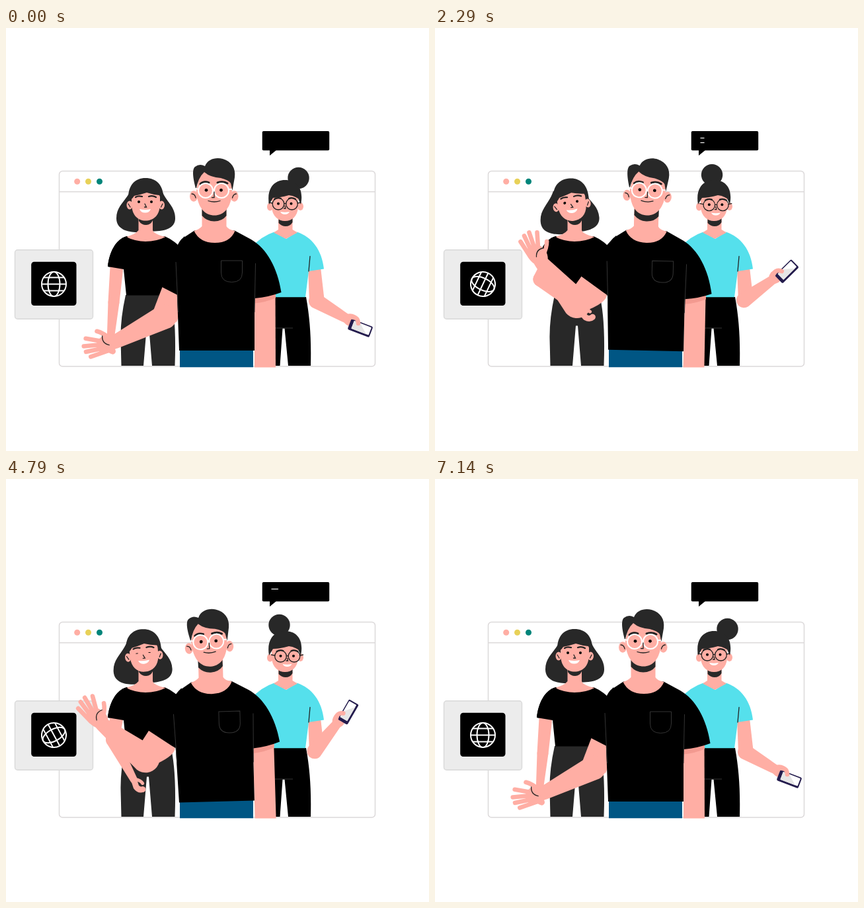
Write an HTML page that moves like this. It is 640x640 px and loops after 7.21 s.

```html
<!DOCTYPE html>
<html lang="en">
<head>
<meta charset="utf-8">
<title>Team greeting</title>
<style>
  html, body { margin: 0; width: 100%; height: 100%; overflow: hidden; background: #fff; }
  svg { display: block; width: 100%; height: 100%; }
  .skin { fill: #ffaea4; }
  .dark { fill: #282828; }
  .line { fill: none; stroke: #222; stroke-width: 1.3; stroke-linecap: round; }
  .brow { fill: none; stroke: #222; stroke-width: 2.2; stroke-linecap: round; }
  .seam { fill: none; stroke: #343434; stroke-width: 1; }
  .frame { fill: none; stroke: #dcd9da; stroke-width: 1.5; }
  .white { fill: none; stroke: #fff; stroke-width: 2; }
  .finger { fill: none; stroke: #ffaea4; stroke-width: 6.6; stroke-linecap: round; stroke-linejoin: round; }
</style>
</head>
<body>
<svg viewBox="0 0 640 640">
  <defs><clipPath id="floor"><rect width="640" height="513.5"/></clipPath></defs>

  <!-- browser window -->
  <rect class="frame" x="80.5" y="216.5" width="478" height="295.5" rx="5"/>
  <path class="frame" d="M80.500 247.800H558.500"/>
  <circle cx="107.700" cy="232.300" r="4.500" fill="#ffaea4"/>
  <circle cx="124.500" cy="232.300" r="4.500" fill="#e8d158"/>
  <circle cx="141.500" cy="232.300" r="4.500" fill="#00857a"/>

  <!-- speech bubble -->
  <rect x="387.700" y="156" width="101.500" height="29.200" rx="2"/>
  <path d="M399 184V193L410 184Z"/>
  <path id="text1" stroke="#fff" stroke-width="1.2"/>
  <path id="text2" stroke="#fff" stroke-width="1.2"/>

  <!-- icon card -->
  <rect x="13.500" y="335.700" width="118" height="104.500" rx="4" fill="#ececec" stroke="#d9d9d9" stroke-width="1.400"/>
  <rect x="38.200" y="353.700" width="68.300" height="66.300" rx="4.500"/>
  <g id="globe" class="white">
    <circle r="18.500"/><ellipse rx="9" ry="18.500"/>
    <path d="M-18.500 0H18.500M-15.500 -10H15.500M-15.500 10H15.500"/>
  </g>

  <!-- woman on the left -->
  <g>
    <path id="hairBack" class="dark" d="M190 243C182 262 167 268 167 288C167 305 185 309 198 309L225 307.500C246 307 256 300 256 288C256 268 240 262 235 243Z"/>
    <path class="dark" d="M181 404Q173 440 173.500 470L174.500 511H208L213 450.500H216L221 511H255.500Q258 440 249 404Z"/>
    <path d="M183 315C166 319 156 340 154 361L178 365L182 404.500H262V330Q252 320 240 315Z"/>
    <path class="skin" d="M200.500 284V306Q196 312 181.500 316Q196 323 211 323Q228 323 241.500 316Q224 312 222 306V284Z"/>
    <path class="dark" d="M201 285V292Q205 298 212 298Q219 298 222 291V285Z"/>
    <g id="leftHead">
      <ellipse class="skin" cx="187" cy="268" rx="4.500" ry="6.500"/>
      <ellipse class="skin" cx="235.500" cy="268" rx="4.500" ry="6.500"/>
      <path class="skin" d="M190 245V268C191 284 200 291.500 211 291.500C223 291.500 232 284 233 268V245Z"/>
      <path class="dark" d="M185.500 262C183 240 194 227 211 227C229 227 240 240 238 262Q234 259 232 253Q222 252 213 249Q204 252 194 254Q190 260 185.500 262Z"/>
      <path class="brow" d="M196 256Q200 253.500 206 255M216 255Q222 253 227 256"/>
      <ellipse class="eyeL" cx="201" cy="263" rx="2" ry="2"/><ellipse class="eyeL" cx="220" cy="263" rx="2" ry="2"/>
      <path class="line" d="M210 266L212.500 271H209.500M185 266L188 271M237 266L234.500 271"/>
      <path fill="#fff" d="M202 274Q211 276 219 274Q217 279.500 210.500 279.500Q204 279.500 202 274Z"/>
    </g>
    <path id="leftUpper" class="skin"/><path id="leftFore" class="skin"/>
    <g id="leftHand">
      <path class="finger" style="stroke-width:9" d="M0 0L11 2Q18 1 19 -5"/>
      <path class="finger" style="stroke-width:5" d="M0 -2Q6 -9 11 -9"/>
    </g>
    <path d="M183 315C166 319 156 340 154 361L178 365L190 330Z"/>
  </g>

  <!-- woman on the right -->
  <g>
    <path d="M383 407H454C460 440 462 470 461 511H427L421.500 454.500H418.500L414.500 511H383Z"/>
    <path class="seam" d="M407 454H434"/>
    <path class="skin" d="M457 362L476 362L481.500 410L459 414Z"/>
    <g id="rightFore">
      <path id="rightForeShape" class="skin"/>
      <ellipse class="skin" cx="522" cy="442" rx="12" ry="9.500" transform="rotate(15 522 442)"/>
      <g transform="translate(536 454) rotate(21)">
        <rect x="-17.500" y="-8.500" width="35" height="17" rx="2" fill="#241c4d"/>
        <rect x="-12.500" y="-7" width="28" height="12.500" rx="1" fill="#fff"/>
        <path fill="#e6e6e6" d="M-12.500 -7H-3L12 5.500H-12.500Z"/>
      </g>
      <path class="finger" d="M520 437L529 438.500Q533 441 533 447"/>
    </g>
    <path fill="#55e0ec" d="M406 308.500L424 319L440 308.500C463 316 478 336 481 364.500L458 368L453 407.200H370V333Q386 315 406 308.500Z"/>
    <path class="line" d="M460 345.500L458 368"/>
    <path class="skin" d="M412 284V305L405 309.500L423.500 319L441 309.500L433.500 305V284Z"/>
    <path class="dark" d="M412.500 286V295Q417 300 423 300Q430 300 433.500 294V286Z"/>
    <circle id="bun" class="dark" r="16.200"/>
    <ellipse class="skin" cx="399.500" cy="270.500" rx="4.500" ry="6"/>
    <ellipse class="skin" cx="445.500" cy="270" rx="4.500" ry="6"/>
    <path class="skin" d="M402 248V271C403 285 412 292 422 292C433 292 441 285 442 271V248Z"/>
    <path class="dark" d="M398 267C394 244 405 230 422 230C440 230 451 243 446 267L442 258Q436 254 428 253Q414 257 404 257Q401 262 398 267Z"/>
    <g id="rightFace">
      <path class="brow" d="M406 259Q411 256 416 258M428 258Q433 256 438 259"/>
      <circle class="line" cx="412" cy="266.200" r="8.800"/><circle class="line" cx="432.500" cy="266.200" r="8.800"/>
      <path class="line" d="M420.800 266Q422.300 265 423.700 266M403.200 265L398 264M441.300 265L446 264M422 269L423 273H420.500"/>
      <circle cx="412" cy="265.700" r="2"/><circle cx="431.500" cy="265.700" r="2"/>
      <path fill="#fff" d="M415 278Q422 279.500 429 278Q427 282 422 282Q417 282 415 278Z"/>
    </g>
  </g>

  <!-- man in the middle -->
  <g clip-path="url(#floor)">
    <path fill="#005684" d="M263 484H374V513.500H263Z"/>
    <g id="man">
      <path id="manUpper" class="skin"/>
      <g id="manFore">
        <path id="manForeShape" class="skin"/>
        <ellipse class="skin" cx="95" cy="4" rx="18" ry="13.500"/>
        <path class="finger" d="M100 -6L127 -2M102 0L130 8M102 6L129 17M100 10L121 26M88 8Q94 22 101 28"/>
        <path class="line" d="M97 18Q103 8 94 1"/>
      </g>
      <path id="manSleeve"/>
      <path class="skin" d="M376 395H407.500L408 525H376Z"/>
      <path fill="#f39a90" d="M376 405L408 398V408.500Q393 415 376 416.500Z"/>
      <path d="M285 306.500L266 319Q255 330 257 354L262 488H376V409Q398 407 416.500 400C411 363 394 333 371 320L346 306.500Z"/>
      <path class="seam" d="M257 354L260.500 430M377.500 356L376 430M325.500 352H357.500V370Q357.500 384.500 341.500 384.500Q325.500 384.500 325.500 370Z"/>
      <path class="skin" d="M296.500 272V300Q292 305 284.500 307Q293 325 316 325Q339 325 346.500 307Q336 305 333.500 300V272Z"/>
      <g id="manHead">
        <path class="dark" d="M296.500 274V284Q304 292.500 315 292.500Q327 292.500 333.500 284V274Z"/>
        <ellipse class="skin" cx="284" cy="254.500" rx="6" ry="8.200"/>
        <ellipse class="skin" cx="345.500" cy="254.500" rx="6" ry="8.200"/>
        <path class="line" d="M281 251Q286 251 287 257M348.500 251Q344 251 342.500 257"/>
        <path class="skin" d="M288 245L293 222L302 212L342 226V245C342 271 330 283.500 315.500 283.500C300 283.500 289 271 288 245Z"/>
        <path class="dark" d="M287.500 244C283 228 281 214 286 210Q293 204.500 301 209C305 198 318 195 328 198C341 202 348 212 346 226L342.500 246L340 235Q337 230 325 227Q309 226 300 218Q291 226 287.500 244Z"/>
        <path class="brow" style="stroke-width:3" d="M294 236Q299 231 307 234M320 234Q328 231 335 235"/>
        <circle class="white" cx="302" cy="246" r="11"/><circle class="white" cx="326" cy="246" r="11"/>
        <path class="white" d="M312.500 245.500Q314 244 315.500 245.500M291.500 244L287 243M336.500 244L342 244"/>
        <ellipse class="eyeM" cx="303" cy="245.300" rx="2.400" ry="2.400"/><ellipse class="eyeM" cx="325.500" cy="245.300" rx="2.400" ry="2.400"/>
        <path class="line" d="M315 248V256.500H311.500"/>
        <path class="line" d="M306 261.500Q315 264.500 324 261.500"/>
      </g>
    </g>
  </g>
</svg>
<script>
  const LOOP = 7210, HALF = LOOP / 2;
  const el = Object.fromEntries([...document.querySelectorAll('[id]')].map(node => [node.id, node]));
  const set = (id, name, value) => el[id].setAttribute(name, value);
  const move = (id, value) => set(id, 'transform', value);
  const mix = (a, b, k) => a + (b - a) * k;
  const mixPoint = (a, b, k) => [mix(a[0], b[0], k), mix(a[1], b[1], k)];
  const clamp = x => Math.min(1, Math.max(0, x));
  const smooth = x => x * x * (3 - 2 * x);

  // Eased value between [time, value] pairs.
  function track(t, keys) {
    const i = keys.findIndex(key => key[0] > t);
    if (i < 0) return keys[keys.length - 1][1];
    if (i === 0) return keys[0][1];
    const [t0, v0] = keys[i - 1], [t1, v1] = keys[i];
    return mix(v0, v1, smooth((t - t0) / (t1 - t0)));
  }

  // Tapered limb with round ends.
  function limb([ax, ay], ra, [bx, by], rb) {
    const angle = Math.atan2(by - ay, bx - ax);
    const nx = -Math.sin(angle), ny = Math.cos(angle);
    return `M${ax + nx * ra} ${ay + ny * ra}L${bx + nx * rb} ${by + ny * rb}` +
      `A${rb} ${rb} 0 0 0 ${bx - nx * rb} ${by - ny * rb}` +
      `L${ax - nx * ra} ${ay - ny * ra}A${ra} ${ra} 0 0 0 ${ax + nx * ra} ${ay + ny * ra}Z`;
  }

  const SWAY = [[100, 0], [880, 1.6], [1740, -2.2], [2400, 1.6], [3040, -2.2],
    [3730, 1.6], [4600, -2.2], [5300, 1.6], [6350, 0]];
  const RAISE = [[70, 0], [880, 1], [5300, 1], [6400, 0]];
  const TILT = [[150, 0], [760, 1], [1680, 0], [2400, 1], [3000, 1], [3530, 0]];
  const PHONE = [[70, 0], [900, 1], [2000, 1], [3040, 0]];

  function drawMan(t) {
    const sway = track(t, SWAY), raise = track(t, RAISE);
    move('man', `rotate(${sway} 319 490)`);
    move('manHead', `rotate(${sway * 1.2} 315 288)`);
    const elbow = mixPoint([240, 437], [213, 420], raise);
    const tip = mixPoint([236.5, 392], [219, 378], raise);
    const pit = mixPoint([264, 406], [258, 405], raise);
    const [x, y] = elbow;
    set('manSleeve', 'd', `M270 315Q250 335 ${tip}L${pit}L290 400Z`);
    set('manUpper', 'd', `M${tip}L${x - 18} ${y - 7}L${x + 18} ${y + 8}Q${pit[0]} ${y - 4} ${pit}Z`);
    set('manForeShape', 'd', limb([0, 0], mix(18.5, 21.5, raise), [84, 1], 10.5));
    move('manFore', `translate(${elbow}) rotate(${mix(152.5, 223.5 + 3 * sway, raise)})`);
  }

  function drawLeftWoman(t) {
    const tilt = track(t % HALF, TILT);
    move('leftHead', `rotate(${-8.5 * tilt} 212 298)`);
    move('hairBack', `translate(${-7 * tilt} ${2 * tilt}) rotate(${-5 * tilt} 212 298)`);
    const elbow = mixPoint([163, 415], [159, 378], tilt);
    const degrees = mix(95, 35, tilt), angle = degrees * Math.PI / 180;
    const length = mix(55, 80, tilt);
    const wrist = [elbow[0] + length * Math.cos(angle), elbow[1] + length * Math.sin(angle)];
    const elbowWidth = mix(8.5, 11, tilt);
    set('leftUpper', 'd', limb([167.5, 362], 10, elbow, elbowWidth));
    set('leftFore', 'd', limb(elbow, elbowWidth, wrist, 5.5));
    move('leftHand', `translate(${wrist}) rotate(${degrees})`);
  }

  function drawRightWoman(t) {
    const up = track(t % HALF, PHONE);
    move('rightFore', `rotate(${-81 * up} 467.5 414)`);
    move('rightFace', `translate(${3.5 * up} ${2 * up})`);
    move('bun', `translate(${mix(442.5, 413.5, up)} ${mix(227, 221, up)})`);
  }

  function drawBubble(t) {
    const start = t < 2360 ? 60 : t < 4700 ? 2360 : 4700;
    const phase = t - start;
    const erase = clamp((phase - 1300) / 1010);
    const first = 55.5 * clamp(phase / 480) * (1 - erase ** 1.4);
    const second = 28 * clamp((phase - 600) / 310) * (1 - erase ** 3);
    set('text1', 'd', `M401.500 166.500h${first}`);
    set('text2', 'd', `M401.500 173.500h${second}`);
  }

  function blink(selector, open, closed) {
    for (const eye of document.querySelectorAll(selector)) eye.setAttribute('ry', closed ? 0.5 : open);
  }

  function draw(t) {
    drawMan(t);
    drawLeftWoman(t);
    drawRightWoman(t);
    drawBubble(t);
    move('globe', `translate(72.500 387.500) rotate(${360 * Math.min(1, t / 7140)})`);
    blink('.eyeL', 2, Math.abs(t - 4790) < 100);
    blink('.eyeM', 2.4, Math.abs(t - 6070) < 100);
  }

  set('rightForeShape', 'd', limb([469.5, 413], 11.5, [516, 440], 7));

  function frame() {
    draw(performance.now() % LOOP);
    requestAnimationFrame(frame);
  }
  frame();
</script>
</body>
</html>
```
